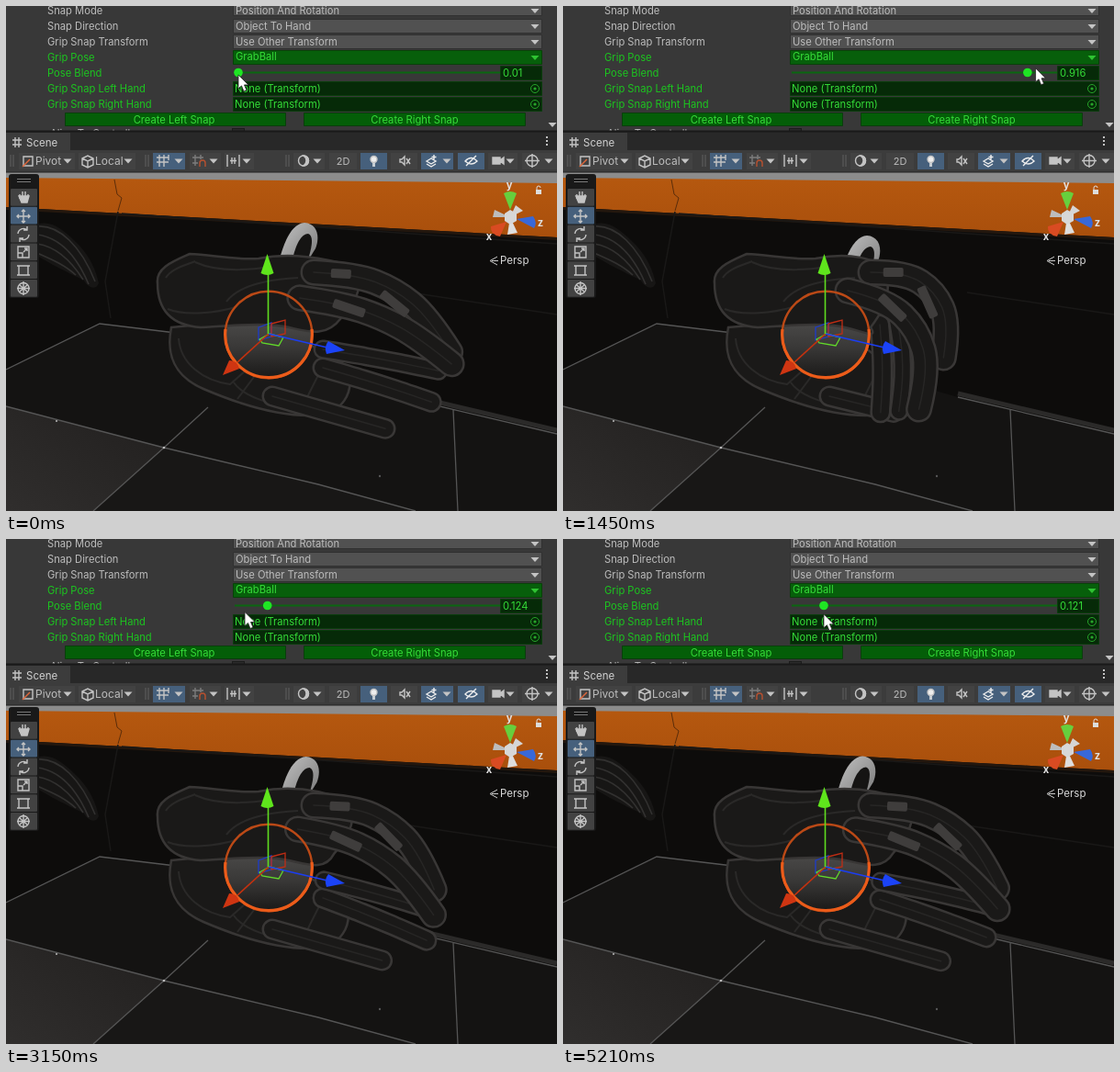
An HTML page for the animation above (5.24 s loop, 600 px wide and 550 px high).

```html
<!DOCTYPE html>
<html lang="en">
<head>
<meta charset="utf-8">
<title>Pose blend</title>
<style>
  html, body { margin: 0; width: 100%; height: 100%; overflow: hidden; background: #0d0c0b; }
  svg { display: block; width: 600px; height: 550px; }
  text { font: 11.2px Inter, "Liberation Sans", sans-serif; fill: #bdbdbd; white-space: pre; }
  .green text { fill: #1cc51f; }
  .lit text { fill: #35dc38; }
  .bar text { font-size: 12px; }
  .axis text { font-weight: 700; fill: #e0e0e0; }
  .mid { text-anchor: middle; }
  .line { fill: none; stroke: #c4c4c4; stroke-width: 1.4; }
  .tile { fill: none; stroke: #555; stroke-width: 1.3; }
  .seam { fill: none; stroke: #191817; stroke-width: 1.5; }
  .finger { fill: none; stroke-linecap: round; stroke-linejoin: round; }
  .crease { fill: none; stroke: #2a2928; stroke-width: 2; }
  .cloth { fill: #1a1918; stroke: #383635; stroke-width: 2.5; }
</style>
</head>
<body>
<svg viewBox="0 0 600 550">
  <defs>
    <path id="tri" d="M-4.5-2h9L0 3z" fill="#c4c4c4"/>
    <g id="pick"><circle r="4.5" fill="none" stroke="#27a52a"/><circle r="1.6" fill="#27a52a"/></g>
    <path id="grip" d="M0 0v13M3 0v13" stroke="#606060"/>
    <linearGradient id="orange" x2="0" y2="1">
      <stop stop-color="#b5580f"/><stop offset="1" stop-color="#a94f0c"/>
    </linearGradient>
    <linearGradient id="ballShade" x2="0" y2="1">
      <stop offset=".4" stop-color="#474645"/><stop offset=".65" stop-color="#393837"/><stop offset="1" stop-color="#1b1a19"/>
    </linearGradient>
    <linearGradient id="loopShade" x2="1" y2="1">
      <stop stop-color="#c4c4c4"/><stop offset="1" stop-color="#777"/>
    </linearGradient>
    <linearGradient id="floor" x1="0" y1="1" x2="1" y2="0">
      <stop stop-color="#302e2d"/><stop offset="1" stop-color="#211f1e"/>
    </linearGradient>
    <clipPath id="panel"><path d="M0 0h600v136H0z"/></clipPath>
  </defs>

  <!-- room -->
  <path d="M0 181h600v369H0z" fill="#0d0c0b"/>
  <path d="M0 181h600v13L0 188z" fill="#8c8c8c"/>
  <path d="M0 187L600 193V252L0 219z" fill="url(#orange)"/>
  <path d="M0 219L600 252v3L0 222z" fill="#23170e"/>
  <path d="M118 189l3 16 5 4-4 14" fill="none" stroke="#5b2d0a"/>
  <path d="M0 396L102 346 185 356 430 426 600 466V550H0z" fill="#141312"/>
  <path d="M172 481L340 521 446 550H95z" fill="#181716"/>
  <path d="M0 436L172 481 95 550H0z" fill="url(#floor)"/>
  <path class="seam" d="M122 224L108 300 114 340M126 226L600 259M440 312L600 336"/>
  <path d="M430 422L600 462" stroke="#2b2a29" stroke-width="5"/>
  <path class="tile" d="M0 396L102 346 185 356M0 436L172 481 340 521 446 550M220 437L172 481 95 550M430 426L600 466M487 440L492 550"/>
  <g fill="#bbb"><circle cx="55" cy="452" r="1"/><circle cx="172" cy="481" r="1.3"/><circle cx="407" cy="512" r="1.2" fill="#555"/></g>

  <!-- far glove -->
  <path d="M34 238C50 232 65 246 80 261C92 274 98 288 101 302C97 311 89 306 84 298C66 290 47 280 34 272z" fill="#171615"/>
  <path d="M34 240C58 238 82 262 97 300M34 249C58 252 76 270 90 303M34 259C54 262 70 276 84 298M34 269C50 276 64 282 76 293" fill="none" stroke="#323130" stroke-width="1.6"/>

  <!-- main glove -->
  <g id="loop">
    <path d="M297 279C303 254 312 237 325 236C339 237 342 251 337 264L326 282z" fill="url(#loopShade)"/>
    <path d="M311 281C314 262 321 248 329 248C335 250 334 262 327 281z" fill="#151413"/>
  </g>
  <path id="palm" class="cloth"/>
  <path class="crease" d="M188 362C190 390 215 408 244 412L262 396M248 410C258 425 290 436 322 438L344 394M270 404L252 428"/>
  <circle cx="286" cy="358" r="46" fill="url(#ballShade)"/>
  <g id="lower"></g>
  <path id="back" class="cloth"/>
  <path class="crease" d="M174 296C180 286 196 282 206 278M176 330C196 338 230 334 250 328M206 279C230 290 262 288 288 284M240 322C252 306 280 298 318 296"/>
  <g id="upper"></g>
  <g id="pads" fill="#3f3d3c"></g>

  <!-- selection and move handles -->
  <circle cx="286" cy="358" r="47.300" fill="none" stroke="#bb4916" stroke-width="2.400"/>
  <path d="M239 352A47.300 47.300 0 1 0 333 352" fill="none" stroke="#ec5c1a" stroke-width="3.200"/>
  <g fill="none" stroke-width="1.3">
    <path d="M275 350L289 345V360L275 364z" stroke="#1d3ccc"/>
    <path d="M289 346L304 342V357L289 360z" stroke="#c02d14"/>
    <path d="M276 363L287 357 302 361 297 370 279 367z" stroke="#62d82a"/>
  </g>
  <path d="M286 357L252 388" stroke="#c3310f" stroke-width="1.6"/>
  <path d="M236 402L243 386Q252 386 254 395z" fill="#cf3512"/>
  <path d="M286 357L350 372" stroke="#1b3df2" stroke-width="1.6"/>
  <path d="M369 375L351 365Q346 371 349 379z" fill="#1b43f7"/>
  <path d="M285.500 357V291" stroke="#5fdc1f" stroke-width="1.6"/>
  <path d="M284.500 270L291.500 291Q284.500 295 277.500 291z" fill="#5fe51c"/>

  <!-- view axes -->
  <g class="axis">
    <path d="M549 230L532 222 530 230z" fill="#bdbdbd"/>
    <path d="M549 230L555 217 563 223z" fill="#d5d5d5"/>
    <path d="M549 230L546 249 557 247z" fill="#dedede"/>
    <path d="M549 222L542 204Q549 200 556 204z" fill="#67cf3d"/>
    <path d="M556 232L574 229Q579 236 575 242z" fill="#3868d8"/>
    <path d="M545 235L528 240Q527 249 538 251z" fill="#d94b22"/>
    <path d="M543 226l6-4 7 4v8l-7 4-6-4z" fill="#d7d7d7"/>
    <text class="mid" x="548" y="199">y</text><text class="mid" x="526" y="255">x</text><text class="mid" x="582" y="240">z</text>
    <path d="M577 200h6v5h-6z" fill="#ddd"/><path d="M578 200v-2a2 2 0 0 1 4 0" fill="none" stroke="#ddd"/>
  </g>
  <path d="M535 273L527 277.500 535 282M529 277.500h7" fill="none" stroke="#ccc"/>
  <text x="538" y="281" style="font-size:11.500px;fill:#d8d8d8">Persp</text>

  <!-- tool palette -->
  <rect x="3" y="183" width="33" height="135" rx="3" fill="#191919"/>
  <path d="M12 188.500h15M12 191.500h15" stroke="#777"/>
  <g id="tools"></g>
  <g class="line">
    <path d="M15 210v-5M18 208v-6M21 208v-6M24 209v-4"/>
    <path d="M14 207l3 7h6l2-7z" fill="#c4c4c4"/>
    <path d="M19 222v14M12 229h14M17 224l2-2 2 2M17 234l2 2 2-2M14 227l-2 2 2 2M24 227l2 2-2 2"/>
    <path d="M13 248a6 6 0 0 1 10-4M25 249a6 6 0 0 1-10 4M23 240v4h-4M15 257v-4h4"/>
    <path d="M13 262h12v12H13zM13 269h5v5M19 268l4-4M20 264h3v3"/>
    <path d="M14 283h10v10H14zM12 283h4M22 283h4M12 293h4M22 293h4"/>
    <circle cx="19" cy="307.500" r="6"/><path d="M19 300v15M12 307.500h14M15 304l8 7M23 304l-8 7"/>
  </g>

  <!-- inspector -->
  <g clip-path="url(#panel)">
    <path d="M0 0h600v137H0z" fill="#383838"/>
    <path d="M247.500-4.500h336v15h-336zM247.500 14.500h336v15h-336zM247.500 31.500h336v15h-336z" fill="#515151" stroke="#303030"/>
    <path d="M247.500 48.500h336v15h-336z" fill="#075f0b" stroke="#084108"/>
    <path d="M249 72.500h289" stroke="#0b6611" stroke-width="2"/>
    <path d="M538.500 65.500h45v15h-45zM247.500 82.500h336v15h-336zM247.500 99.500h336v15h-336z" fill="#062a08" stroke="#0a3d0c"/>
    <path d="M64.500 116.500h240v14h-240zM324.500 116.500h241v14h-241z" fill="#045e08" stroke="#0a3d0c"/>
    <use href="#tri" x="576" y="5"/><use href="#tri" x="576" y="22"/><use href="#tri" x="576" y="39"/>
    <path d="M571.500 54h9L576 59z" fill="#2fc332"/>
    <use href="#pick" x="576" y="90"/><use href="#pick" x="576" y="107"/>
    <text x="45" y="9">Snap Mode</text><text x="250" y="9">Position And Rotation</text>
    <text x="45" y="26">Snap Direction</text><text x="250" y="26">Object To Hand</text>
    <text x="45" y="43">Grip Snap Transform</text><text x="250" y="43">Use Other Transform</text>
    <g class="green">
      <text x="45" y="60">Grip Pose</text><text x="45" y="77">Pose Blend</text>
      <text x="45" y="94">Grip Snap Left Hand</text><text x="45" y="111">Grip Snap Right Hand</text>
    </g>
    <g class="lit">
      <text x="250" y="59">GrabBall</text><text id="value" x="541" y="77"></text>
      <text x="249" y="94">None (Transform)</text><text x="249" y="111">None (Transform)</text>
      <text class="mid" x="183" y="128">Create Left Snap</text><text class="mid" x="445" y="128">Create Right Snap</text>
    </g>
    <circle id="knob" cy="72.500" r="4.800" fill="#1fe524"/>
    <text x="48" y="143">Align To Controller</text>
    <rect x="246.500" y="133.500" width="13" height="13" fill="#2a2a2a" stroke="#1c1c1c"/>
    <use href="#tri" x="595" y="129"/>
  </g>

  <!-- scene tab and toolbar -->
  <g class="bar">
    <path d="M0 136h600v22H0z" fill="#282828"/>
    <path d="M0 136.500h600" stroke="#191919" stroke-width="2"/>
    <path d="M0 138h70v20H0z" fill="#3c3c3c"/>
    <path class="line" d="M10 143v11M14 143v11M7 146h10M7 151h10"/>
    <text x="22" y="153" style="font-size:11.500px;fill:#d2d2d2">Scene</text>
    <path d="M588 142h2v2h-2zM588 146h2v2h-2zM588 150h2v2h-2z" fill="#c4c4c4"/>
    <path d="M0 157h600v24H0z" fill="#3c3c3c"/>
    <path d="M0 181h600" stroke="#222"/>
    <use href="#grip" x="5" y="162"/><use href="#grip" x="152" y="162"/><use href="#grip" x="305" y="162"/>
    <path d="M14 160h61v18H14zM79 160h62v18H79zM200 160h34v18h-34zM238 160h32v18h-32zM313 160h34v18h-34zM352 160h30v18h-30zM419 160h29v18h-29zM525 160h32v18h-32zM562 160h38v18h-38z" fill="#424242"/>
    <path d="M160 160h35v18h-35zM386 160h29v18h-29zM452 160h35v18h-35zM492 160h29v18h-29z" fill="#46607c"/>
    <g id="arrows"></g>
    <text x="32" y="173">Pivot</text><text x="97" y="173">Local</text>
    <text class="mid" x="367" y="173" style="font-size:11px">2D</text>
    <g class="line">
      <path d="M19 164h10v10H19z"/><path d="M18 175l8-8" stroke="#e0673a"/>
      <path d="M83 166l6-3 6 3v7l-6 3-6-3zM83 166l6 3 6-3M89 169v7"/>
      <path d="M167 162v13M172 162v13M164 165h13M164 170h13M177 162v6"/>
      <path d="M206 162v12M212 162v5M203 165h12M203 171h6" stroke="#7d7d7d"/><path d="M211 175v-4a3 3 0 0 1 6 0v4" stroke="#b8512f"/>
      <path d="M241 162v13M254 162v13M244 168.500h7M246 165v7M249 165v7"/>
      <circle cx="324" cy="168.500" r="5.500"/><path d="M324 163a5.500 5.500 0 0 1 0 11c4-3 4-8 0-11z" fill="#c4c4c4"/>
      <circle cx="400.500" cy="167" r="3.500" fill="#eee"/><path d="M399 172h3M399 174h3" stroke="#eee"/>
      <path d="M429 167h2l3-3v9l-3-3h-2zM436 166l4 6M440 166l-4 6"/>
      <path d="M458 169l5-3 5 3-5 3zM458 172l5 3 5-3M466 162v5M463.500 164.500h5" stroke="#eee"/>
      <path d="M500 169q6.500-7 13 0q-6.500 6-13 0zM501 174l11-11" stroke="#eee"/>
      <path d="M530 165h8v7h-8zM538 168l4-3v7l-4-3" fill="#c4c4c4"/>
      <circle cx="573" cy="168.500" r="6"/><path d="M573 161v15M565 168.500h16"/>
    </g>
  </g>

  <path id="cursor" d="M0 0V15L3.500 12 6 18 9 16.800 6.500 11H11z" fill="#fff" stroke="#222" stroke-width=".8"/>
</svg>

<script>
const LOOP = 5240;
const LEAD = 80;        // the cursor runs ahead of the slider
const HAND_DELAY = 35;  // the hand follows the slider
const GRIP = .7;        // blend at which the fist is closed
const LOW = .01, HIGH = .95;

// Rests and turning points of the slider: time, blend
const TURNS = [
  [0, LOW], [660, LOW], [1560, HIGH], [1940, .108], [2128, .108], [2641, HIGH],
  [3300, LOW], [3721, LOW], [4111, HIGH], [4365, HIGH], [4881, LOW], [5210, .121]
];

const $ = id => document.getElementById(id);
const clamp = (v, lo, hi) => Math.min(hi, Math.max(lo, v));
const mix = (a, b, f) => a.map((v, i) => v + (b[i] - v) * f);
const rad = deg => deg * Math.PI / 180;

function add(parent, tag, attrs) {
  const el = document.createElementNS("http://www.w3.org/2000/svg", tag);
  for (const k in attrs) el.setAttribute(k, attrs[k]);
  parent.append(el);
  return el;
}

function blendAt(time) {
  const t = clamp(time, 0, TURNS.at(-1)[0]);
  const i = Math.max(1, TURNS.findIndex(k => k[0] >= t));
  const [t0, v0] = TURNS[i - 1], [t1, v1] = TURNS[i];
  return v0 + (v1 - v0) * (1 - Math.cos(Math.PI * (t - t0) / (t1 - t0))) / 2;
}

// A finger is a chain of four bones: base x, base y, bone length, first angle, bend per joint
function makeFinger(layer, width, open, closed) {
  const group = add($(layer), "g", { class: "finger" });
  const paths = [["#393736", width], ["#1a1918", width - 5], ["#272625", 1.5]]
    .map(([stroke, w]) => add(group, "path", { stroke, "stroke-width": w }));
  const finger = { joints: [] };
  finger.pose = curl => {
    let [x, y, len, angle, bend] = mix(open, closed, curl);
    finger.joints = [{ x, y, angle }];
    for (let i = 0; i < 4; i++, angle += bend) {
      x += len * Math.cos(rad(angle));
      y += len * Math.sin(rad(angle));
      finger.joints.push({ x, y, angle });
    }
    paths.forEach(p => p.setAttribute("d", smooth(finger.joints)));
  };
  return finger;
}

function smooth(p) {
  let d = `M${p[0].x} ${p[0].y}`;
  for (let i = 1; i < p.length - 2; i++)
    d += `Q${p[i].x} ${p[i].y} ${(p[i].x + p[i + 1].x) / 2} ${(p[i].y + p[i + 1].y) / 2}`;
  const [a, b] = p.slice(-2);
  return d + `Q${a.x} ${a.y} ${b.x} ${b.y}`;
}

const under = [
  makeFinger("lower", 23, [290, 425, 32, 16, 0], [290, 425, 18, 14, 0]),
  makeFinger("lower", 23, [345, 394, 31, 16, 1], [345, 347, 24, 85, 3]),
  makeFinger("lower", 21, [345, 374, 32, 9, 1], [364, 342, 25, 80, 6])
];
const index = makeFinger("upper", 29, [335, 290, 46, 3, 18], [335, 290, 38, 0, 33]);
const middle = makeFinger("upper", 29, [320, 318, 46, 8, 10], [310, 310, 45, 14, 30]);

// Knuckle pads: finger, place along it in bones, shift inwards, length
const pads = [[index, .65, 0, 22], [index, 2.2, 12, 36], [middle, 1.2, 2, 36]].map(([finger, at, shift, width]) => ({
  finger, at, shift,
  el: add($("pads"), "rect", { x: -width / 2, y: -5, width, height: 10, rx: 2 })
}));

function placePad({ finger, at, shift, el }) {
  const i = Math.floor(at), a = finger.joints[i], b = finger.joints[i + 1], f = at - i;
  const angle = b.angle;
  const x = a.x + (b.x - a.x) * f - shift * Math.sin(rad(angle));
  const y = a.y + (b.y - a.y) * f + shift * Math.cos(rad(angle));
  el.setAttribute("transform", `translate(${x} ${y}) rotate(${angle})`);
}

for (let i = 0; i < 6; i++)
  add($("tools"), "rect", { x: 5, y: 199 + i * 19.8, width: 29, height: 18.8, rx: 1, fill: i === 1 ? "#46607c" : "#424242" });

for (const x of [67, 133, 188, 226, 262, 339, 480, 549, 591])
  add($("arrows"), "use", { href: "#tri", x, y: 168.5 });

const slideX = v => 250.2 + 279 * v;

function drawHand(curl) {
  const late = curl * curl;
  under.forEach(f => f.pose(late));
  index.pose(curl);
  middle.pose(curl);
  pads.forEach(placePad);
  $("loop").setAttribute("transform", `translate(${6 * curl} ${14 * late})`);

  const [x1, y1, x2, y2] = mix([382, 284, 365, 340], [350, 290, 335, 350], curl);
  $("back").setAttribute("d", `M165 302C163 285 182 278 200 270C225 271 248 277 275 275C310 268 345 274 ${x1} ${y1}`
    + `Q${x1 + 12} ${y1 + 25} ${x2} ${y2}C345 366 320 350 295 348C265 345 245 349 212 350C184 348 165 335 165 302z`);
  const px = 372 - 26 * late;
  $("palm").setAttribute("d", `M180 350C174 380 183 403 215 417C250 432 290 446 330 446C${px - 4} 446 ${px + 8} 420 ${px} 395`
    + `C350 368 260 340 180 350z`);
}

function draw(t) {
  const blend = blendAt(t), ahead = blendAt(t + LEAD);
  $("knob").setAttribute("cx", slideX(blend));
  $("value").textContent = String(+blend.toFixed(3));
  $("cursor").setAttribute("transform", `translate(${slideX(ahead)} ${75 + 8 * t / LOOP - 10 * ahead})`);
  drawHand(clamp(blendAt(t - HAND_DELAY) / GRIP, 0, 1));
}

const start = performance.now();
function tick() {
  draw((performance.now() - start) % LOOP);
  requestAnimationFrame(tick);
}
tick();
</script>
</body>
</html>
```
